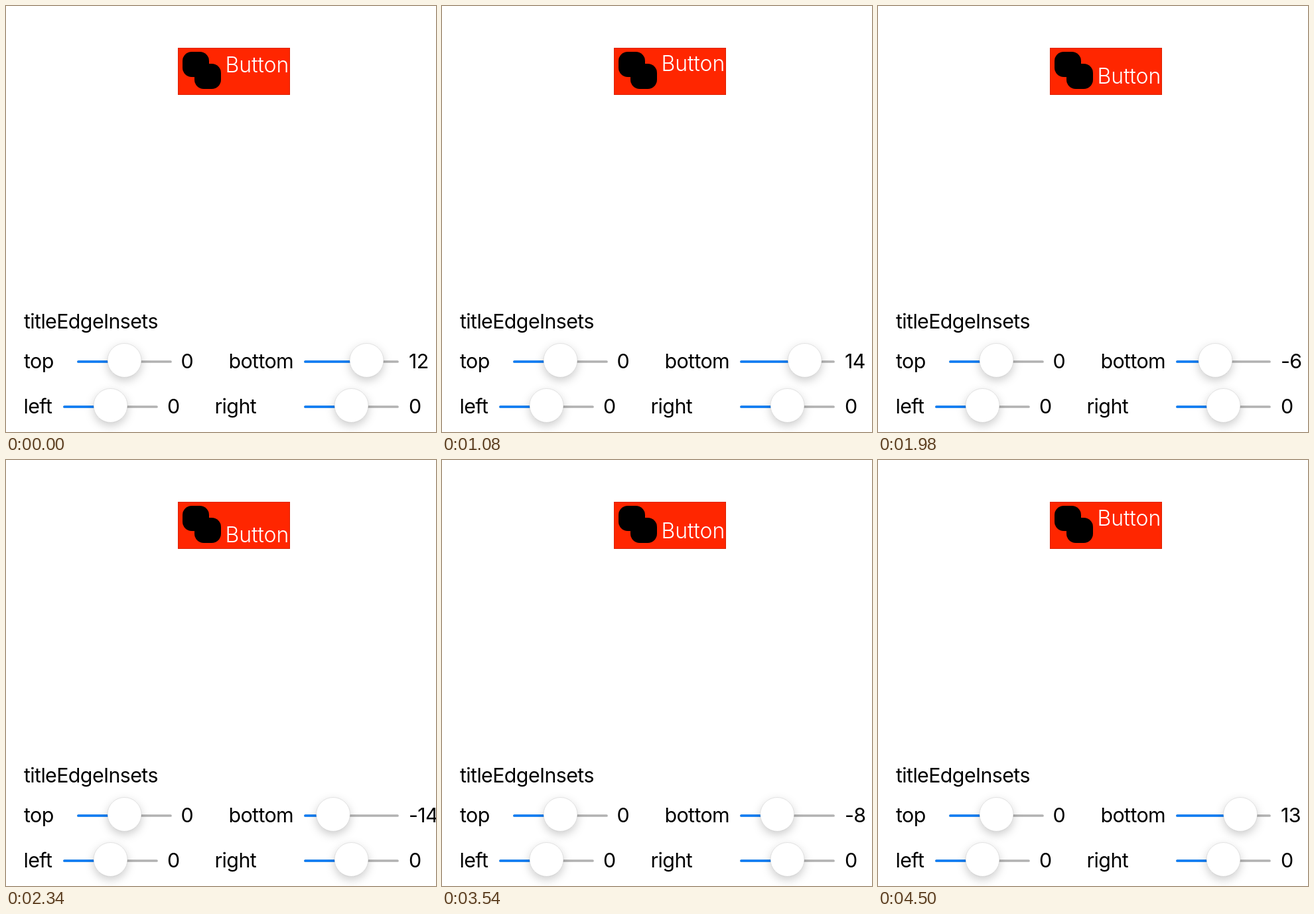
These frames come from a looping animation (648x642 px, 4560 ms). An HTML page:

```html
<!DOCTYPE html>
<html lang="en">
<head>
<meta charset="utf-8">
<title>titleEdgeInsets</title>
<style>
  html, body { margin: 0; width: 100%; height: 100%; overflow: hidden; background: #fff; }
  svg { display: block; width: 648px; height: 642px; }
  text { font: 400 30.4px Inter, sans-serif; letter-spacing: -.62px; fill: #000; }
  #title { font-size: 32px; font-weight: 350; letter-spacing: -.1px; fill: #fff; }
  line { stroke-width: 3.7; stroke-linecap: round; }
  .rail { stroke: #b2b2b2; }
  .fill { stroke: #087cf6; }
  .thumb { fill: #fff; stroke: rgba(0, 0, 0, .1); stroke-width: 1; filter: url(#shadow); }
</style>
</head>
<body>
<svg viewBox="0 0 648 642">
  <defs>
    <filter id="shadow" x="-60%" y="-60%" width="220%" height="220%">
      <feDropShadow dx="0" dy="5" stdDeviation="7" flood-color="#000" flood-opacity=".2"/>
    </filter>
  </defs>
  <rect x="259.5" y="63.5" width="168" height="70" fill="#ff2600" stroke="#dc2100"/>
  <rect x="266" y="69" width="40" height="38" rx="14"/>
  <rect x="284" y="87" width="40" height="38" rx="14"/>
  <text id="title" x="330.5">Button</text>
  <text x="27" y="486">titleEdgeInsets</text>
  <g id="rows"></g>
</svg>
<script>
const LOOP = 4560, STEP = 60, UNIT_MS = 45, MAX = 24;
const TRACK = 143, RADIUS = 25.5;
const rows = document.getElementById('rows');
const title = document.getElementById('title');

function add(tag, attrs, text = '') {
  const el = document.createElementNS('http://www.w3.org/2000/svg', tag);
  for (const key in attrs) el.setAttribute(key, attrs[key]);
  el.textContent = text;
  rows.append(el);
  return el;
}

function slider(name, labelX, trackX, numberX, y) {
  add('text', { x: labelX, y: y + 11.5 }, name);
  const rail = { x1: trackX + 2, x2: trackX + TRACK - 2, y1: y + 2, y2: y + 2 };
  add('line', { ...rail, class: 'rail' });
  const fill = add('line', { ...rail, class: 'fill' });
  const thumb = add('circle', { cy: y, r: RADIUS, class: 'thumb' });
  const number = add('text', { x: numberX, y: y + 11.5 });
  const set = value => {
    const x = trackX + TRACK / 2 + value / MAX * (TRACK / 2 - RADIUS);
    fill.setAttribute('x2', x);
    thumb.setAttribute('cx', x);
    number.textContent = Math.round(value) || 0;
  };
  set(0);
  return set;
}

slider('top', 27, 107, 263.5, 534);
const setBottom = slider('bottom', 335.5, 449, 607, 534);
slider('left', 26.5, 86, 243, 602);
slider('right', 314.5, 449, 607, 602);

// Constant-speed drag: up to the maximum, down to the minimum, back up.
function inset(t) {
  if (t < 615) return Math.min(MAX, 12 + t / UNIT_MS);
  if (t < 2820) return Math.max(-MAX, MAX - (t - 615) / UNIT_MS);
  return -MAX + (t - 2820) / UNIT_MS;
}

function draw(now) {
  const t = Math.floor(now % LOOP / STEP) * STEP;
  const value = inset(t);
  setBottom(value);
  title.setAttribute('y', 111 - value * 11 / 12);
  requestAnimationFrame(draw);
}
draw(performance.now());
</script>
</body>
</html>
```
